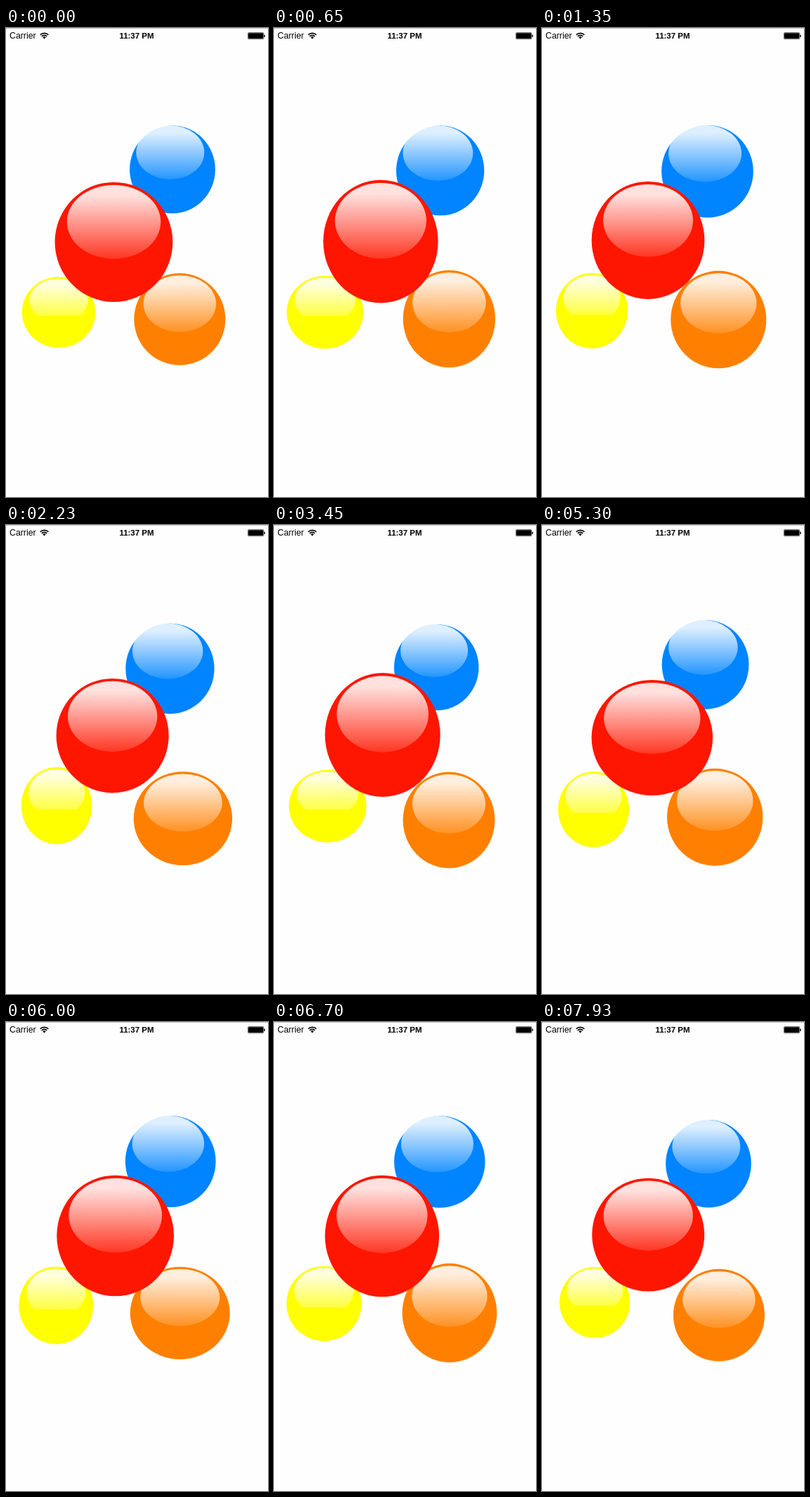
Animation, 373 px wide and 666 px high, one loop 8000 ms. Source, as an HTML page with a canvas:

```html
<!DOCTYPE html>
<html lang="en">
<head>
<meta charset="utf-8">
<title>Floating bubbles</title>
<style>
  html, body { margin: 0; width: 100%; height: 100%; overflow: hidden; background: #fefefe; }
  canvas { position: absolute; left: 0; top: 0; width: 373px; height: 666px; }
  span { position: absolute; top: 4px; line-height: 15px; white-space: nowrap; color: #000;
         font-family: "Liberation Sans", Arial, sans-serif; }
  .carrier { left: 5px; font-size: 12.3px; }
  .clock { left: 0; width: 372px; text-align: center; font-size: 11.5px; font-weight: bold; }
</style>
</head>
<body>
<canvas width="373" height="666"></canvas>
<span class="carrier">Carrier</span>
<span class="clock">11:37 PM</span>
<script>
const ctx = document.querySelector('canvas').getContext('2d');
const LOOP = 8000, STEP = 87.62, DRIFT = 3, SWELL = 0.1;

// orbit, wide and tall are periods in seconds; shift offsets the gloss; glossEnd cuts its fade
const balls = [
  { x: 234, y: 201, size: 120, color: '#0084ff', orbit: 8, wide: 5, tall: 5, shift: -0.026, glossEnd: 1 },
  { x: 74, y: 401, size: 100.3, color: '#ffff00', orbit: 5, wide: 3, tall: 4, shift: 0, glossEnd: 0.85 },
  { x: 249, y: 416, size: 130, color: '#ff8000', orbit: 6, wide: 4, tall: 2, shift: 0, glossEnd: 1 },
  { x: 154, y: 301, size: 160, color: '#ff1600', orbit: 7, wide: 6, tall: 3, shift: 0, glossEnd: 1 }
];

// cubic-bezier(.42, 0, .58, 1)
function easeInOut(x) {
  let lo = 0, hi = 1;
  for (let i = 0; i < 20; i++) {
    const t = (lo + hi) / 2, r = 1 - t;
    if (1.26 * r * r * t + 1.74 * r * t * t + t * t * t < x) lo = t; else hi = t;
  }
  return lo * lo * (3 - 2 * lo);
}

const phase = (time, period) => (time / period) % 1;
const triangle = p => 1 - Math.abs(1 - 2 * p);

function ellipse(x, y, rx, ry, fill) {
  ctx.beginPath();
  ctx.ellipse(x, y, rx, ry, 0, 0, 2 * Math.PI);
  ctx.fillStyle = fill;
  ctx.fill();
}

function glossFill(top, bottom, end) {
  const fade = ctx.createLinearGradient(0, top, 0, bottom);
  const from = 0.87, to = 0.14, flat = 0.14;
  const last = from + (to - from) * (end - flat) / (1 - flat);
  fade.addColorStop(0, `rgba(255,255,255,${from})`);
  fade.addColorStop(flat, `rgba(255,255,255,${from})`);
  fade.addColorStop(end, `rgba(255,255,255,${last})`);
  if (end < 1) fade.addColorStop(end, 'rgba(255,255,255,0)');
  return fade;
}

function drawBall(b, time) {
  const angle = 2 * Math.PI * phase(time, b.orbit);
  const x = b.x + DRIFT * Math.cos(angle), y = b.y + DRIFT * Math.sin(angle);
  const w = b.size * (1 + SWELL * triangle(easeInOut(phase(time, b.wide))));
  const h = b.size * (1 + SWELL * triangle(phase(time, b.tall)));
  ellipse(x, y, w / 2, h / 2, b.color);

  const gx = x + w * b.shift, gy = y + h * (b.shift - 0.168), ry = h * 0.308;
  ellipse(gx, gy, w * 0.398, ry, glossFill(gy - ry, gy + ry, b.glossEnd));
}

function drawStatusIcons() {
  ctx.fillStyle = '#c4c4c4';
  ctx.fillRect(0, 0, 373, 1);

  const cx = 54.5, cy = 15.6, from = -0.75 * Math.PI, to = -0.25 * Math.PI;
  ctx.fillStyle = ctx.strokeStyle = '#000';
  ctx.lineWidth = 1.7;
  for (const r of [8.3, 5.3]) {
    ctx.beginPath();
    ctx.arc(cx, cy, r, from, to);
    ctx.stroke();
  }
  ctx.beginPath();
  ctx.moveTo(cx, cy);
  ctx.arc(cx, cy, 3.2, from, to);
  ctx.fill();

  ctx.lineWidth = 0.6;
  ctx.beginPath();
  ctx.roundRect(344.3, 6.6, 22.6, 9.2, 1.5);
  ctx.stroke();
  ctx.beginPath();
  ctx.roundRect(345, 7.3, 21.2, 7.8, 1);
  ctx.fill();
  ctx.beginPath();
  ctx.arc(367.2, 11.2, 1.7, -Math.PI / 2, Math.PI / 2);
  ctx.fill();
}

function draw(ms) {
  const t = ms % LOOP;
  const held = t < 90 ? 0 : 44 + STEP * Math.max(1, Math.floor((t - 26) / STEP));
  const time = 15.95 + 1.024 * held / 1000;
  ctx.fillStyle = '#fefefe';
  ctx.fillRect(0, 0, 373, 666);
  drawStatusIcons();
  for (const b of balls) drawBall(b, time);
}

let start;
function tick(now) {
  start ??= now;
  draw(now - start);
  requestAnimationFrame(tick);
}
draw(0);
requestAnimationFrame(tick);
</script>
</body>
</html>
```
